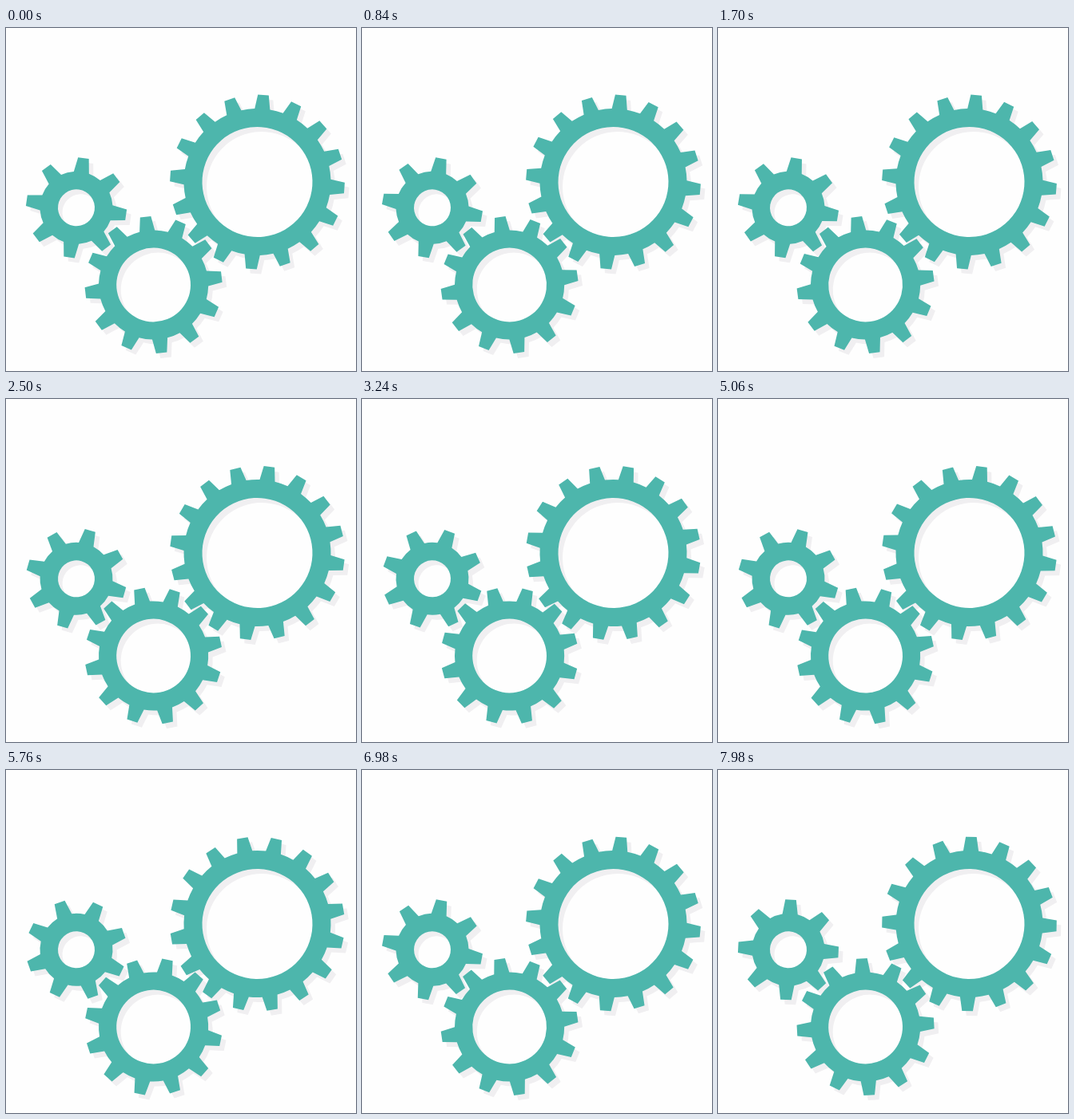
An HTML page for the animation above (8 s loop, 438x430 px).

```html
<!DOCTYPE html>
<html lang="en">
<head>
<meta charset="utf-8">
<title>Gears</title>
<style>
  html, body { margin: 0; width: 100%; height: 100%; overflow: hidden; background: #fefefe; }
  svg { display: block; width: 100%; height: 100%; }
  #shadows { fill: #f0eff1; }
  #wheels { fill: #4db6ac; }
</style>
</head>
<body>
<svg viewBox="0 0 438 430">
  <g id="shadows" transform="translate(5.5 6)"></g>
  <g id="wheels"></g>
</svg>
<script>
const NS = 'http://www.w3.org/2000/svg';
const LOOP = 8000;

// start and step are degrees; step follows from the tooth ratio
const gears = [
  { x: 88, y: 225.3, teeth: 8, hole: 23, root: 45.5, tip: 62.8, start: 10.6, step: -2.4 },
  { x: 184.6, y: 322, teeth: 12, hole: 46.4, root: 68.6, tip: 85.8, start: 21.7, step: 1.6 },
  { x: 314.5, y: 193, teeth: 16, hole: 69, root: 92, tip: 109.2, start: 5.15, step: -1.2 }
];

function circle(r) {
  return `M${-r} 0A${r} ${r} 0 1 1 ${r} 0A${r} ${r} 0 1 1 ${-r} 0Z`;
}

function gearPath({ teeth, hole, root, tip }) {
  const foot = 9.6, top = 6.8;
  const base = Math.sqrt(root * root - foot * foot);
  const points = [[-foot, -base], [-top, -tip], [top, -tip], [foot, -base]];
  let d = '';
  for (let i = 0; i < teeth; i++) {
    const a = i * 2 * Math.PI / teeth;
    const c = Math.cos(a), s = Math.sin(a);
    points.forEach(([x, y], n) => {
      const p = `${(x * c - y * s).toFixed(2)} ${(x * s + y * c).toFixed(2)}`;
      d += n ? `L${p}` : i ? `A${root} ${root} 0 0 1 ${p}` : `M${p}`;
    });
  }
  const [x, y] = points[0];
  return `${d}A${root} ${root} 0 0 1 ${x} ${y}Z${circle(hole)}`;
}

function addPath(layer, d) {
  const path = document.createElementNS(NS, 'path');
  path.setAttribute('d', d);
  path.setAttribute('fill-rule', 'evenodd');
  document.getElementById(layer).append(path);
  return path;
}

for (const gear of gears) {
  const d = gearPath(gear);
  gear.paths = [addPath('shadows', d), addPath('wheels', d)];
}

// Ticks come in threes: two of 20 ms, then one of 100 ms
function tickAt(time) {
  const t = time + 20;
  const rest = t % 140;
  return 3 * Math.floor(t / 140) + (rest < 20 ? 0 : rest < 40 ? 1 : 2);
}

function render(time) {
  const tick = tickAt(time);
  for (const { x, y, start, step, paths } of gears) {
    const angle = (start + step * tick).toFixed(3);
    for (const p of paths) p.setAttribute('transform', `translate(${x} ${y}) rotate(${angle})`);
  }
}

const begin = performance.now();
function frame() {
  render((performance.now() - begin) % LOOP);
  requestAnimationFrame(frame);
}
frame();
</script>
</body>
</html>
```
